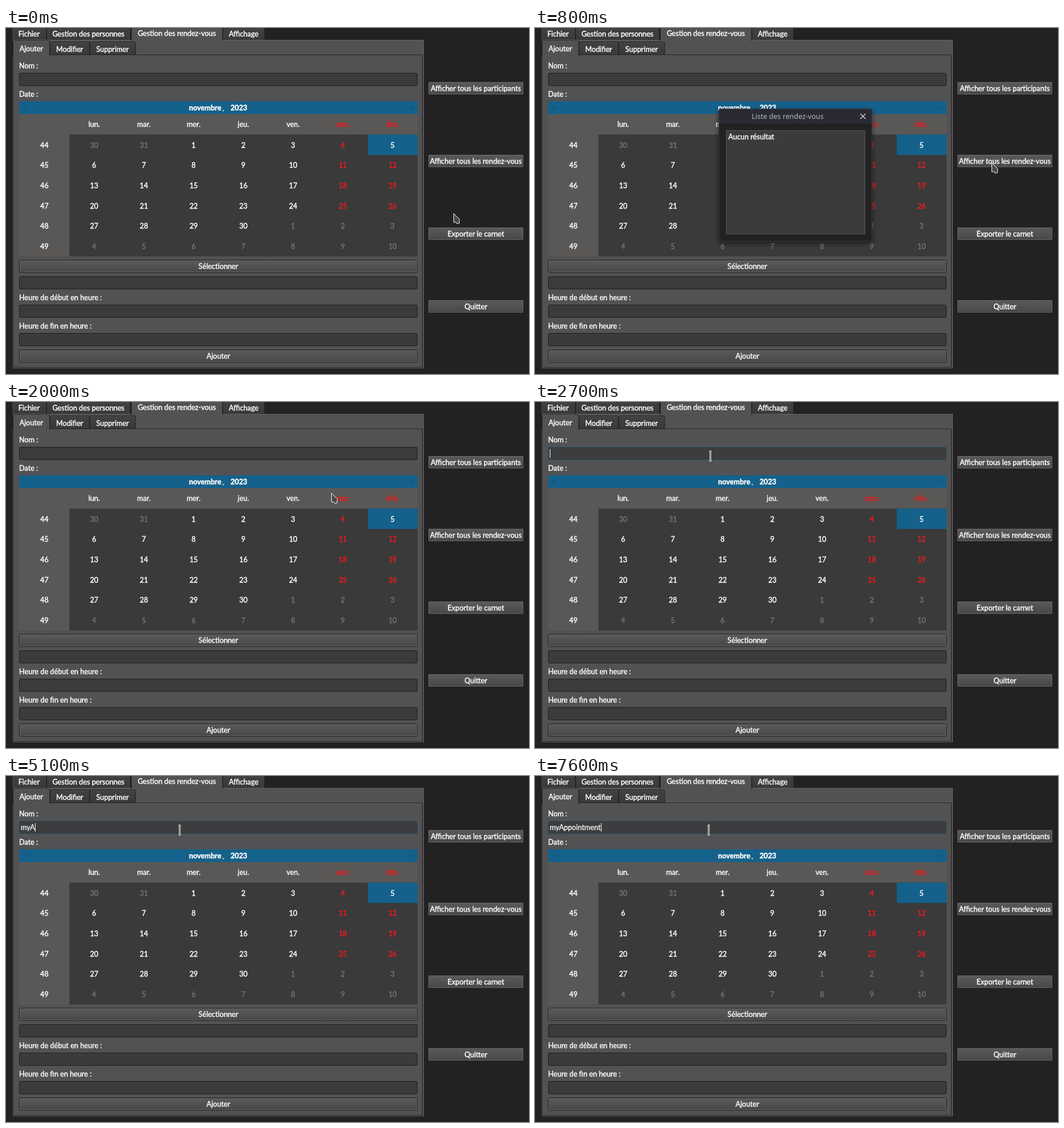
An HTML page that plays this animation: 920 by 609 pixels, repeating every 8 s.

```html
<!DOCTYPE html>
<html lang="fr">
<head>
<meta charset="utf-8">
<style>
  html, body { margin: 0; width: 100%; height: 100%; overflow: hidden; background: #232122; }
  svg { display: block; width: 920px; height: 609px; }
  text { font: 12.7px Lato, sans-serif; fill: #fcfcfc; stroke: #fcfcfc; stroke-width: .45px; white-space: pre; }
  .middle { text-anchor: middle; }
  .bold { font-weight: bold; }
  .red { fill: #ee1a1e; stroke: #ee1a1e; }
  .dim { fill: #7b7b7b; stroke: #7b7b7b; stroke-width: .25px; }
  .title { font: 12.5px "Noto Sans", sans-serif; fill: #b9bac0; stroke: none; }
  .typed { stroke-width: .3px; }
</style>
</head>
<body>
<svg id="stage" viewBox="0 0 920 609">
  <defs>
    <linearGradient id="raised" x2="0" y2="1">
      <stop stop-color="#5b5b5d"/><stop offset="1" stop-color="#474749"/>
    </linearGradient>
    <linearGradient id="tab" x2="0" y2="1">
      <stop stop-color="#424244"/><stop offset="1" stop-color="#39393b"/>
    </linearGradient>
    <filter id="shadow" x="-10%" y="-10%" width="120%" height="125%">
      <feDropShadow dx="0" dy="3" stdDeviation="4" flood-opacity=".55"/>
    </filter>
  </defs>
</svg>
<script>
const stage = document.getElementById('stage');
const PANEL = '#525254', EDGE = '#1e1d1e', RIM = '#636365';
const FIELD = '#3b3b3b', BLUE = '#14618b', HEAD = '#5a5856';

function add(tag, attrs, parent = stage) {
  const node = document.createElementNS('http://www.w3.org/2000/svg', tag);
  for (const key in attrs) node.setAttribute(key, attrs[key]);
  return parent.appendChild(node);
}

const rect = (x, y, width, height, fill, more = {}, parent = stage) =>
  add('rect', { x, y, width, height, fill, ...more }, parent);

const path = (d, stroke, more = {}, parent = stage) =>
  add('path', { d, stroke, fill: 'none', ...more }, parent);

// y is the optical middle of the line
function label(content, x, y, className = '', parent = stage) {
  const node = add('text', { x, y: y + 4.5, class: className }, parent);
  node.textContent = content;
  return node;
}

function button(content, x, y, width, height) {
  rect(x + .5, y + .5, width - 1, height - 1, 'url(#raised)', { rx: 2, stroke: EDGE });
  rect(x + 1.5, y + 1.5, width - 3, height - 3, 'none', { rx: 1, stroke: '#666668' });
  label(content, x + width / 2, y + height / 2, 'middle');
}

const field = y => rect(23.5, y + .5, 700, 22, FIELD, { rx: 2.5, stroke: EDGE });

function tab(content, left, right, top, bottom, textY, active) {
  const shape = `M${left + .5} ${bottom}V${top + 2.5}q0-2 2-2H${right - 2}q2 0 2 2V${bottom}`;
  path(shape, EDGE, { fill: active ? PANEL : 'url(#tab)' });
  path(`M${left + 2} ${top + 1.5}H${right - 2}`, active ? '#6a6a6c' : '#505052');
  label(content, (left + right) / 2, textY, 'middle');
}

function drawWindow() {
  rect(12.5, 21.5, 722, 577, PANEL, { stroke: RIM });
  tab('Fichier', 10, 71, -3, 21, 10);
  tab('Gestion des personnes', 71, 219, -3, 21, 10);
  tab('Affichage', 381, 455, -3, 21, 10);
  tab('Gestion des rendez-vous', 220, 381, -5, 23, 9, true);

  rect(13.5, 47.5, 719, 550, PANEL, { stroke: EDGE });
  path('M14.5 597V48.5H732', RIM);
  tab('Modifier', 77, 147, 24, 47, 37);
  tab('Supprimer', 147, 228, 24, 47, 37);
  tab('Ajouter', 12, 77, 22, 49, 36, true);

  label('Nom :', 23, 66);
  label('Date :', 23, 116);
  label('Heure de début en heure :', 23, 474);
  label('Heure de fin en heure :', 23, 524);
  [437, 487, 537].forEach(field);
  button('Sélectionner', 23, 408, 701, 23);
  button('Ajouter', 23, 566, 701, 23);

  ['Afficher tous les participants', 'Afficher tous les rendez-vous', 'Exporter le carnet', 'Quitter']
    .forEach((content, i) => button(content, 742, 94 + 128 * i, 169, 24));
}

function drawCalendar() {
  const columnX = c => 67.5 + 87.5 * c, rowY = r => 206 + 35.7 * r;
  rect(23, 129, 701, 273, HEAD);
  rect(23, 129, 701, 22.5, BLUE);
  rect(111.5, 187.5, 612.5, 214.5, '#3a3a3a');
  rect(636.5, 187.5, 87.5, 36, BLUE);
  path('M39 140H30M34 136L30 140L34 144M708 140H717M713 136L717 140L713 144', '#165274');
  label('novembre', 322, 140.5, 'bold');
  label('2023', 395, 140.5, 'bold');
  path('M380 144.5h4.5l-2.25 2.5z', 'none', { fill: '#c5d5de' });

  ['lun.', 'mar.', 'mer.', 'jeu.', 'ven.', 'sam.', 'dim.'].forEach((day, c) =>
    label(day, columnX(c + 1), 169.5, c > 4 ? 'middle red' : 'middle'));
  for (let r = 0; r < 6; r++) {
    label(44 + r, columnX(0), rowY(r), 'middle');
    for (let c = 0; c < 7; c++) {
      const date = r * 7 + c - 1;
      const outside = date < 1 || date > 30;
      const tone = outside ? 'dim' : c > 4 && date !== 5 ? 'red' : '';
      label(date < 1 ? date + 31 : date > 30 ? date - 30 : date, columnX(c + 1), rowY(r), 'middle ' + tone);
    }
  }
}

drawWindow();
drawCalendar();

const nameField = field(79);
const typed = label('', 26, 90.5, 'typed');
const caret = rect(26, 83, 1, 15, '#fcfcfc');

const dialog = add('g', {});
rect(323.5, 142.5, 269, 233, '#232122', { rx: 2, stroke: '#38383d', filter: 'url(#shadow)' }, dialog);
rect(324, 143, 268, 25, '#292a32', {}, dialog);
label('Liste des rendez-vous', 444.5, 155, 'middle title', dialog);
rect(336.5, 180.5, 244, 182, FIELD, { stroke: '#555557' }, dialog);
label('Aucun résultat', 340, 191.5, '', dialog);
const closeGlow = add('circle', { cx: 577, cy: 155.5, r: 11, fill: '#cf6469' }, dialog);
path('M572.5 151l9 9m0-9l-9 9', '#dcdce0', { 'stroke-width': 1.2 }, dialog);

const arrow = path('M.5.5V16H4.5L6 18.5L10.5 17.5V12.5L11.5 11.5Z', '#f4f4f4',
  { fill: '#4a4a4b', 'stroke-linejoin': 'round' });
const beam = add('g', {});
const beamShape = 'M-2-7.5Q0-7.5 0-6Q0-7.5 2-7.5M0-6V8M-2 9Q0 9 0 7.5Q0 9 2 9';
path(beamShape, '#f4f4f4', { 'stroke-width': 2.8 }, beam);
path(beamShape, '#3a3a3b', { 'stroke-width': .9 }, beam);

// time, x, y of the pointer
const route = [
  [0, 787, 326], [700, 803, 237], [900, 803, 237], [1200, 494, 227], [1400, 494, 227],
  [1800, 572, 160], [2100, 572, 160], [2600, 308, 94], [3500, 308, 94], [3800, 307, 94],
  [4000, 307, 94], [4200, 305, 94], [8000, 305, 94]
];

const keystrokes = [
  [0, ''], [3800, 'm'], [4200, 'my'], [5100, 'myA'], [5300, 'myAp'], [5400, 'myApp'],
  [5600, 'myAppo'], [5800, 'myAppoi'], [6000, 'myAppoin'], [6100, 'myAppoint'],
  [6300, 'myAppointe'], [6500, 'myAppointen'], [6800, 'myAppointe'], [7000, 'myAppoint'],
  [7100, 'myAppointm'], [7300, 'myAppointme'], [7400, 'myAppointmen'], [7600, 'myAppointment']
];

function pointerAt(t) {
  const next = Math.max(1, route.findIndex(stop => stop[0] >= t));
  const [t0, x0, y0] = route[next - 1], [t1, x1, y1] = route[next];
  const p = (t - t0) / (t1 - t0), ease = p * p * (3 - 2 * p);
  return [Math.round(x0 + (x1 - x0) * ease), Math.round(y0 + (y1 - y0) * ease)];
}

const show = (node, visible) => node.setAttribute('visibility', visible ? 'visible' : 'hidden');

function render(now) {
  const t = Math.floor(now % 8000 / 100) * 100;
  const [x, y] = pointerAt(t);
  const overField = t > 2100 && y < 102;
  const focused = t >= 2700;

  arrow.setAttribute('transform', `translate(${x} ${y})`);
  beam.setAttribute('transform', `translate(${x + .5} ${y + .5})`);
  show(arrow, !overField);
  show(beam, overField);
  show(dialog, t >= 800 && t < 2000);
  closeGlow.setAttribute('opacity', t >= 1500 && Math.hypot(x - 577, y - 155.5) < 12 ? 1 : 0);

  nameField.setAttribute('fill', focused ? '#3c3d3f' : FIELD);
  nameField.setAttribute('stroke', focused ? '#274a5e' : EDGE);
  typed.textContent = keystrokes.findLast(([time]) => time <= t)[1];
  caret.setAttribute('x', 26 + Math.round(typed.getComputedTextLength()));
  const blinkedOff = (t >= 3200 && t < 3700) || (t >= 4700 && t < 5100);
  show(caret, focused && !blinkedOff);
  requestAnimationFrame(render);
}
requestAnimationFrame(render);
</script>
</body>
</html>
```
